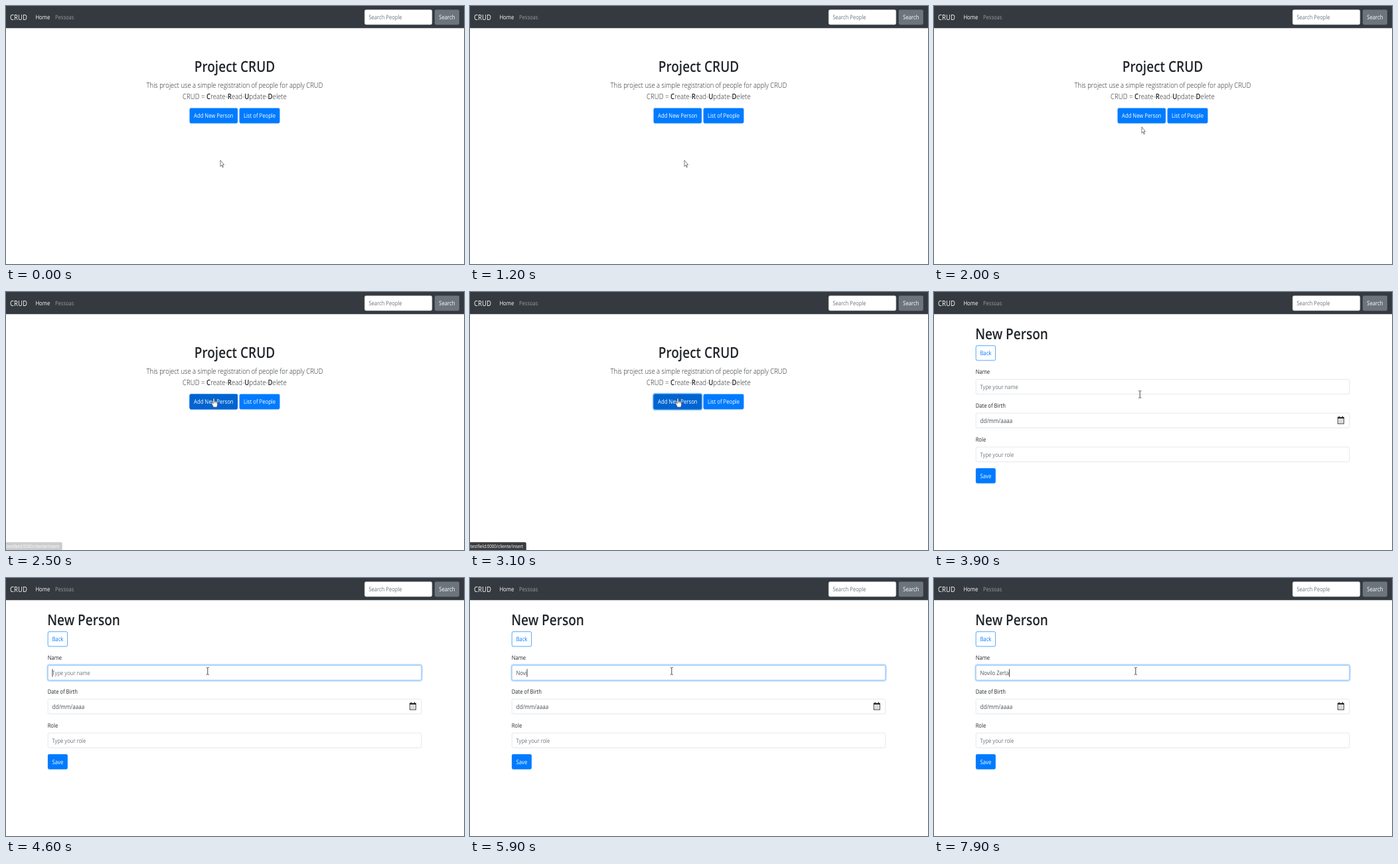
Recreate the animation shown at these times as an HTML page. Size 690 by 388 pixels, loop 8000 ms.

```html
<!DOCTYPE html>
<html lang="en">
<head>
<meta charset="utf-8">
<title>Project CRUD</title>
<style>
  html, body { margin: 0; width: 100%; height: 100%; overflow: hidden; background: #fff; }
  svg { display: block; width: 690px; height: 388px; }
  text {
    font: 15.2px "Open Sans", "Noto Sans", sans-serif;
    fill: #212529; white-space: pre; text-rendering: geometricPrecision;
  }
  .mid { text-anchor: middle; }
  .h1 { font-size: 37.5px; font-weight: 600; }
  .lead { font-size: 18.7px; font-weight: 300; }
  .lead tspan { font-weight: 600; }
  .white { fill: #fff; }
  .hint { fill: #6c757d; font-size: 15px; }
  .value { fill: #495057; }
  .field { fill: #fff; stroke: #ced4da; }
  .blue { fill: #007bff; }
  .pointer { stroke: #2a2a2a; stroke-width: 1.1; stroke-linejoin: round; fill: #fff; }
</style>
</head>
<body>
<!-- The page is laid out at 1360 px wide and shown squeezed into the stage. -->
<svg viewBox="0 0 1360 646.67" preserveAspectRatio="none">
  <rect width="1360" height="647" fill="#fff"/>

  <rect width="1360" height="55.5" fill="#343a40"/>
  <text x="12" y="35.5" class="white" style="font-size:18.8px">CRUD</text>
  <text x="87.5" y="34" class="white">Home</text>
  <text x="146" y="34" fill-opacity=".5" class="white" style="font-size:14.8px">Pessoas</text>
  <rect x="1065" y="9.5" width="200" height="37" rx="4" class="field"/>
  <text x="1077" y="34" class="hint">Search People</text>
  <rect x="1273" y="9" width="73" height="38" rx="4" fill="#6c757d"/>
  <text x="1309.5" y="34" class="white mid">Search</text>

  <g id="home">
    <text x="679" y="165.5" class="h1 mid">Project CRUD</text>
    <text x="679" y="204.5" class="lead mid">This project use a simple registration of people for apply CRUD</text>
    <text x="679" y="234" class="lead mid" style="font-size:19px">CRUD = <tspan>C</tspan>reate-<tspan>R</tspan>ead-<tspan>U</tspan>pdate-<tspan>D</tspan>elete</text>
    <rect id="addRing" x="543.4" y="254.4" width="146.2" height="41.2" rx="5.6" fill="none" stroke="#268fff" stroke-opacity=".5" stroke-width="3.2"/>
    <rect x="545" y="256" width="143" height="38" rx="4" class="blue"/>
    <rect id="addHover" x="545" y="256" width="143" height="38" rx="4" fill="#0064d0"/>
    <text x="616.5" y="280.5" class="white mid">Add New Person</text>
    <rect x="693" y="256" width="120" height="38" rx="4" class="blue"/>
    <text x="753" y="280.5" class="white mid">List of People</text>
  </g>

  <g id="form">
    <text x="122.5" y="118" class="h1">New Person</text>
    <rect x="124.5" y="134.5" width="58" height="37" rx="4" fill="#fff" stroke="#007bff" stroke-width="1.2"/>
    <text x="153.5" y="158.5" class="blue mid">Back</text>

    <text x="123.5" y="205.5" style="font-size:15px">Name</text>
    <rect x="124.5" y="219" width="1109" height="37" rx="4" class="field"/>
    <g id="focus" fill="none">
      <rect x="122.4" y="216.9" width="1113.2" height="41.2" rx="5.6" stroke="#007bff" stroke-opacity=".25" stroke-width="3.2"/>
      <rect x="124.5" y="219" width="1109" height="37" rx="4" stroke="#80bdff" stroke-width="1.2"/>
    </g>
    <text id="nameHint" x="137" y="243.5" class="hint">Type your name</text>
    <text id="name" x="137" y="243.5" class="value"></text>
    <rect id="caret" y="228" width="1.6" height="20" fill="#212529"/>

    <text x="123.5" y="290" style="font-size:15px">Date of Birth</text>
    <rect x="124.5" y="303.5" width="1109" height="37" rx="4" class="field"/>
    <text x="137" y="328.5" class="value" style="font-size:15.9px">dd/mm/aaaa</text>
    <g fill="none" stroke="#222">
      <rect x="1199" y="314" width="18" height="16" stroke-width="1.6"/>
      <path d="M1199 316H1217" stroke-width="2.6"/>
      <path d="M1203 311V315M1213 311V315" stroke-width="2"/>
      <path d="M1202 321.5H1214.5M1202 325.5H1214.5" stroke="#555" stroke-width="1.5" stroke-dasharray="2.2 1.3"/>
    </g>

    <text x="123.5" y="374.5" style="font-size:15px">Role</text>
    <rect x="124.5" y="388.5" width="1109" height="37" rx="4" class="field"/>
    <text x="137" y="413.5" class="hint">Type your role</text>
    <rect x="124" y="441.5" width="59" height="38" rx="4" class="blue"/>
    <text x="153.5" y="466" class="white mid">Save</text>
  </g>

  <g id="status">
    <path d="M0 627H163Q167 627 167 631V647H0Z" fill="#3b3c3f"/>
    <text x="1" y="642" class="white" style="font-size:12.3px">testfield:0000/cliente/insert</text>
  </g>

  <g id="mouse">
    <path id="arrow" class="pointer" d="M0 0V15.5L3.7 12.2 6.2 18 8.7 17 6.3 11.4H11Z"/>
    <g id="hand" class="pointer">
      <path d="M-2 13.5V1.5a2 2 0 0 1 4 0V8a1.8 1.8 0 0 1 3.5 .3 1.8 1.8 0 0 1 3.5 .6 1.6 1.6 0 0 1 2.2 1.4V15c0 3-1.6 4-1.6 7H-1.5C-2 18.5-5 16-7 12.5c-.8-2 1.6-3 3-1.3Z"/>
      <path d="M2 8v4M5.5 8.5v3.5M9 9.5v3" fill="none"/>
    </g>
    <path id="beam" fill="none" stroke="#222" stroke-width="1.5" d="M-4-9q3 0 4 1.5q1-1.5 4-1.5M0-7.5V7.5M-4 9q3 0 4-1.5q1 1.5 4 1.5"/>
  </g>
</svg>
<script>
const LOOP = 8000, SX = 690 / 1360, SY = 0.6;
const HOVER = 2100, CLICK = 3000, OPEN = 3200, FOCUS = 4450;
const NAME = 'Novilo Zerta';
const KEYS = [5100, 5400, 5600, 5880, 6000, 6200, 6500, 6900, 7200, 7400, 7700, 7880];
// time, x, y of the pointer on the stage
const PATH = [
  [1550, 323, 232], [2000, 313, 182], [2350, 313, 160],
  [3750, 313, 160], [4250, 303.8, 140]
];

const $ = id => document.getElementById(id);
const show = (id, on) => { $(id).style.display = on ? '' : 'none'; };
const fade = (id, v) => { $(id).style.opacity = v; };
const ramp = (t, start, ms) => Math.min(1, Math.max(0, (t - start) / ms));

function pointerAt(t) {
  let [, x, y] = PATH[0];
  for (let i = 1; i < PATH.length; i++) {
    const [t0, x0, y0] = PATH[i - 1], [t1, x1, y1] = PATH[i];
    if (t < t0) break;
    const k = ramp(t, t0, t1 - t0);
    x = x0 + (x1 - x0) * k;
    y = y0 + (y1 - y0) * k;
  }
  return [x, y];
}

function drawPointer(t) {
  const [x, y] = pointerAt(t);
  const kind = t >= OPEN && y < 154 ? 'beam'
    : t >= HOVER && t < 3450 ? 'hand' : 'arrow';
  for (const id of ['arrow', 'hand', 'beam']) show(id, id === kind);
  $('mouse').setAttribute('transform', `translate(${x / SX} ${y / SY})`);
}

function drawName(t) {
  const count = KEYS.filter(k => k <= t).length;
  const name = $('name');
  const typed = NAME.slice(0, count);
  if (name.textContent !== typed) name.textContent = typed;
  show('nameHint', !count);
  const since = t - (count ? KEYS[count - 1] : FOCUS + 50);
  show('caret', since >= 0 && since % 1000 < 500);
  $('caret').setAttribute('x', 137 + (count ? name.getComputedTextLength() : 0));
}

function render(t) {
  show('home', t < OPEN);
  show('form', t >= OPEN);
  fade('addHover', ramp(t, HOVER, 150));
  fade('addRing', ramp(t, CLICK - 50, 150));
  fade('status', ramp(t, 2450, 200) - ramp(t, 3400, 200));
  fade('focus', ramp(t, FOCUS, 150));
  drawName(t);
  drawPointer(t);
}

const start = performance.now();
function tick() {
  render((performance.now() - start) % LOOP);
  requestAnimationFrame(tick);
}
tick();
</script>
</body>
</html>
```
